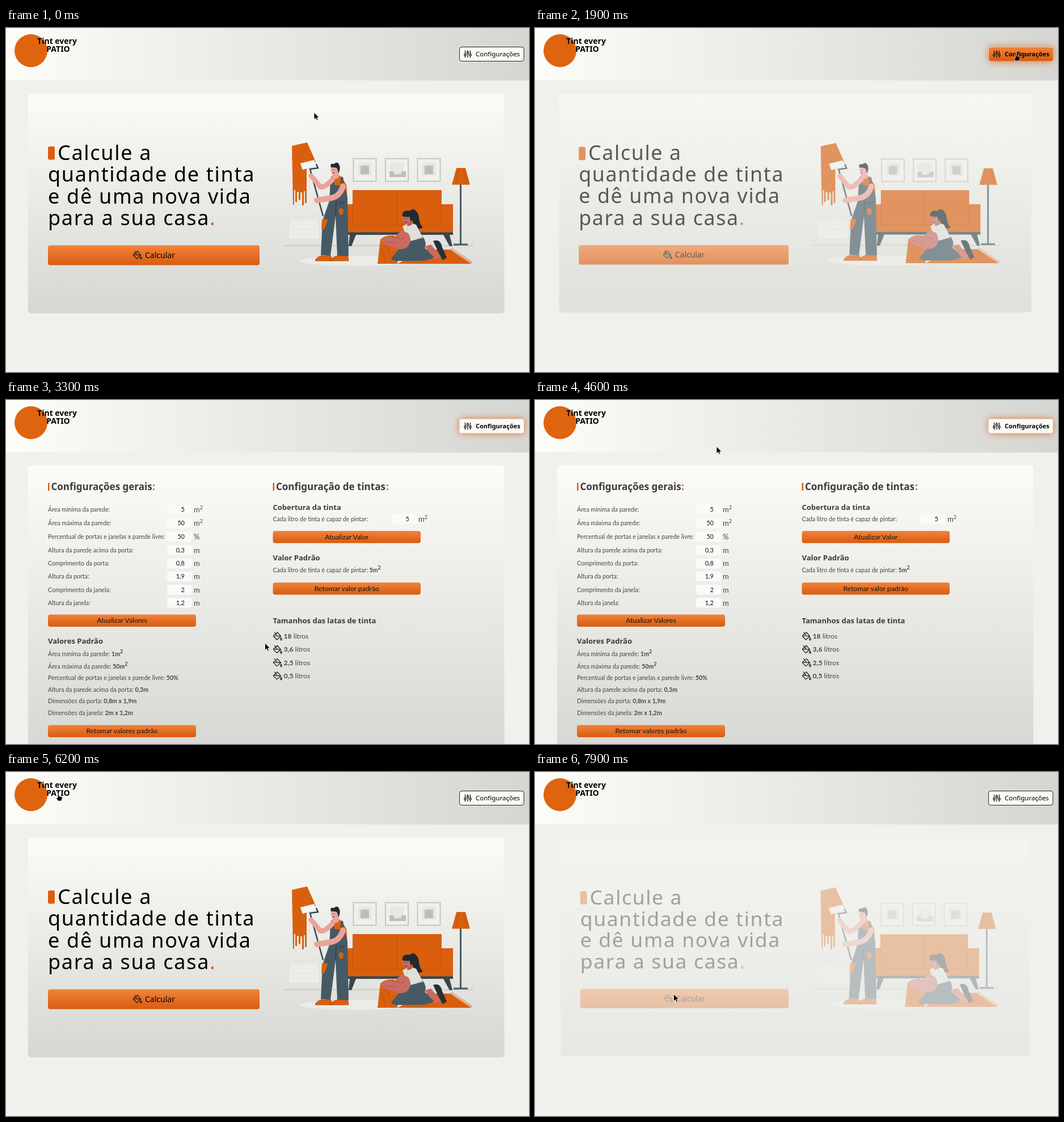
These frames come from a looping animation (922 px wide and 607 px high, 8000 ms). An HTML page:

```html
<!DOCTYPE html>
<html lang="pt">
<head>
<meta charset="utf-8">
<title>Calculadora de tinta</title>
<style>
  html, body { margin: 0; height: 100%; overflow: hidden; background: #f0f1ed; }
  svg { display: block; width: 100%; height: 100%; }
  text { font: 10.6px Lato, sans-serif; fill: #454545; white-space: pre; }
  .brand { font: 800 14px "Noto Sans", sans-serif; fill: #000; text-anchor: middle; }
  .hero { font: 36px "Noto Sans", sans-serif; letter-spacing: 1.7px; fill: #000; }
  .title { font: 600 17px "Noto Sans", sans-serif; fill: #3b3b3b; }
  .sub { font: 600 13px "Noto Sans", sans-serif; fill: #3b3b3b; }
  .nav { font: 11.5px "Noto Sans", sans-serif; fill: #000; }
  .active .nav { font-weight: 700; font-size: 11px; }
  .active #navBox { stroke: none; filter: drop-shadow(0 0 7px #e0651ddd); }
  .call { font: 14px "Noto Sans", sans-serif; fill: #000; }
  .button { font-size: 12.2px; fill: #111; text-anchor: middle; }
  .number { font-size: 11px; fill: #111; text-anchor: end; }
  .unit { font-size: 13px; }
  .size { font-size: 12.2px; }
  .bold { font-weight: 700; }
  .accent { fill: #d95f0e; }
  .line { fill: none; stroke: #111; stroke-width: 1.2; stroke-linejoin: round; stroke-linecap: round; }
</style>
</head>
<body>
<svg id="stage" viewBox="0 0 922 607" preserveAspectRatio="none">
  <defs>
    <linearGradient id="paper" x2="0" y2="1">
      <stop stop-color="#fbfcf8"/><stop offset=".3" stop-color="#f0f1ed"/><stop offset="1" stop-color="#d6d7d3"/>
    </linearGradient>
    <linearGradient id="header">
      <stop stop-color="#fcfdf9"/><stop offset=".3" stop-color="#f0f1ed"/><stop offset="1" stop-color="#d5d6d2"/>
    </linearGradient>
    <linearGradient id="orange" x2="0" y2="1">
      <stop stop-color="#f1833c"/><stop offset="1" stop-color="#d85c10"/>
    </linearGradient>
    <g id="bucket" class="line">
      <path d="M2 6 L8 1 L14 8 L7 14 L1 8 Z M2 7 L13 8 M3 1 L7 6"/>
      <path d="M14.5 10.5 Q12 14 14.5 15 Q17 14 14.5 10.5 Z"/>
    </g>
    <g id="frame">
      <rect x="1" y="1" width="40" height="40" fill="#f0f1ed" stroke="#c6c7c3" stroke-width="2"/>
      <rect x="9" y="8" width="24" height="23" fill="#e6e7e3"/>
    </g>
  </defs>
  <rect width="922" height="607" fill="#f0f1ed"/>

  <g id="home">
    <rect x="39" y="115.5" width="839.5" height="388" rx="5" fill="url(#paper)"/>
    <rect class="accent" x="74" y="209" width="12" height="23.5" rx="3"/>
    <g id="scene">
      <path d="M490 384 H824" stroke="#a9aaa7" stroke-width=".8"/>
      <ellipse cx="619" cy="411" rx="101" ry="9" fill="#ebece8"/>
      <path d="M499 339 h53 v34 h-53 z M499 356 h53 M504 373 v11 M547 373 v11 M518 347 h14 M518 364 h14" fill="#ecede9" stroke="#dedfdb" stroke-width=".8"/>
      <use href="#frame" x="611.5" y="229.5"/><rect x="625" y="243" width="15" height="15" fill="#bdbeba"/>
      <use href="#frame" x="668" y="229.5"/><path d="M676 253 h8 v5 h13 v-5 h8 v10 h-29 z" fill="#bdbeba"/>
      <use href="#frame" x="724.5" y="229.5"/><rect x="738" y="243" width="15" height="15" fill="#bdbeba"/>
      <g fill="#d95f0e">
        <path d="M504 208 L531 202 L546 236 L521 243 L530 247 V308 q-1.5 3 -3 0 V288 h-2 V312 q-1.5 3 -3 0 V290 h-3 V303 q-1.5 2 -3 0 V289 h-3 V306 q-1.5 3 -3 0 V286 h-2 V311 q-1 4 -2 0 Z"/>
        <rect x="600" y="311" width="20" height="50"/>
        <rect x="760" y="311" width="28" height="50"/>
        <rect x="611" y="286" width="157" height="75"/>
        <path d="M794 247 H810 L818 276.5 H786 Z"/>
        <path d="M738 391 H783 L820 416 H690 Z"/>
      </g>
      <path d="M688.5 286 V348 M611 311 V348 H767 V311 M620 350 L626 355 M762 350 L756 355 M797 248 L793 276 M807 248 L812 276" fill="none" stroke="#b54b08" stroke-width=".8"/>
      <path d="M762 392 L788 415 M771 392 L799 415 M779 392 L809 415" stroke="#c2530b" stroke-width=".7"/>
      <path d="M785 390 L822 415" stroke="#d95f0e" stroke-width="5" stroke-dasharray="1 2"/>
      <path d="M602 360.5 H788 V365 H602 Z M606 365 H617 L609 385 H604 Z M771 365 H782 L787 385 H782 Z" fill="#37474f"/>
      <path d="M801.5 276 V382" stroke="#455a64" stroke-width="3"/>
      <rect x="789" y="380.5" width="25" height="3" fill="#455a64"/>

      <path d="M573 262 L588 260 L600 276 L602 303 L574 306 Z" fill="#d95f0e"/>
      <path d="M572 268 L577 266 L580 278 L590 277 L590 262 L594 263 L602 301 L604 402 L584 402 L581 332 L572 402 L555 401 L558 340 L570 305 Z" fill="#455a64"/>
      <path d="M581 332 L582 305 M586 310 L598 307" stroke="#263238"/>
      <path d="M557 338 Q562 335 567 339 L563 351 Q559 358 556 356 Z M586 320 L590 318 L595 320 L594 329 L588 330 Z" class="accent"/>
      <path d="M545 411 Q546 405 555 402 H573 L575 411 Z M571 411 Q573 405 583 402 H603 L604 411 Z" class="accent" stroke="#a5430a" stroke-width=".6"/>
      <path d="M519 239 L543 233 L548 243 L523 250 Z" fill="#f5f5f2" stroke="#d0d1cd" stroke-width=".7"/>
      <path d="M547 240 L550 247 L536 249 L559 332" fill="none" stroke="#344750" stroke-width="2.5"/>
      <path d="M575 268 Q558 286 552 278 L538 261" fill="none" stroke="#eda299" stroke-width="9" stroke-linecap="round"/>
      <path d="M594 279 Q589 297 573 300 L548 304" fill="none" stroke="#eda299" stroke-width="10" stroke-linecap="round"/>
      <path d="M576 255 H587 V264 L580 267 L575 263 Z" fill="#eda299"/>
      <ellipse cx="580" cy="250" rx="7" ry="9" fill="#eda299"/>
      <path d="M573 246 Q570 238 578 240 Q585 234 588 243 Q590 250 586 256 L584 248 Q580 245 573 246 Z" fill="#202a2f"/>
      <path d="M575 250 v1 M578 250 v1 M575 256 q2 1 4 -1" stroke="#202a2f" fill="none"/>

      <path d="M714 326 Q709 320 719 320 Q727 324 728 335 Q729 347 735 352 Q724 358 720 349 Q714 338 714 326 Z" fill="#202a2f"/>
      <path d="M738 386 L749 382 L767 404 L757 408 Z" fill="#c96a62"/>
      <path d="M753 376 Q766 371 769 387 L777 405 L770 410 L763 397 Z" fill="#263238"/>
      <path d="M660 373 Q668 365 684 366 L698 386 Q692 400 690 416 H655 Z" fill="#d95f0e"/>
      <path d="M663 378 Q676 384 680 415 M661 388 Q668 396 667 415" fill="none" stroke="#b54b08" stroke-width=".8"/>
      <path d="M704 378 L733 366 Q743 378 738 388 L754 404 Q748 411 730 411 H688 Q674 410 684 401 Q694 388 704 378 Z" fill="#455a64"/>
      <path d="M699 350 Q710 342 723 347 L735 370 L709 377 Z" fill="#dfdfda"/>
      <path d="M698 357 L709 362 Q717 374 709 385 Q702 393 688 389 L665 381 L661 374 Q668 367 684 369 Z" fill="#c96a62"/>
      <path d="M684 369 L704 372 M668 377 L690 381" stroke="#a94f49" stroke-width=".7"/>
      <path d="M705 340 L714 336 L716 347 L708 350 Z" fill="#b95953"/>
      <ellipse cx="707" cy="336" rx="8" ry="10" fill="#c96a62"/>
      <path d="M699 332 Q697 323 708 322 Q718 323 718 333 L714 342 L711 333 Q704 334 699 332 Z" fill="#202a2f"/>
      <path d="M701 336 h2 M706 336 h2 M702 342 q3 2 5 0" stroke="#202a2f" fill="none" stroke-width=".8"/>
    </g>
  </g>

  <g id="settings">
    <rect x="39" y="115.5" width="839.5" height="509" rx="5" fill="url(#paper)"/>
  </g>

  <rect width="922" height="92.5" fill="url(#header)"/>
  <circle cx="44" cy="40" r="29" fill="#df640f"/>
  <text class="brand" x="90" y="28">Tint every</text>
  <text class="brand" x="92" y="42">PATIO</text>
  <g id="nav">
    <rect id="navBox" x="799.5" y="33.5" width="113.5" height="25" rx="4" fill="#fafbf7" stroke="#222"/>
    <rect id="navHover" x="800" y="34" width="113" height="24.5" rx="4" fill="url(#orange)"/>
    <path class="line" d="M809.5 40 V46 M809.5 49 V52 M814 40 V42 M814 45 V52 M818.5 40 V46 M818.5 49 V52"/>
    <path class="line" d="M808 46 h3 v3 h-3 z M812.5 42 h3 v3 h-3 z M817 46 h3 v3 h-3 z"/>
    <text class="nav" x="828" y="50">Configurações</text>
  </g>
  <g id="pointer">
    <path id="arrow" d="M0 0 V12.5 L3 9.8 L5 14 L7 13 L5.2 9 H9 Z" fill="#000" stroke="#fff" stroke-width=".8"/>
    <path id="hand" d="M-1 .8 Q0 -.5 1.2 .8 V4.5 L6 5.5 Q7.5 6 7 8.5 L5.5 13 H-.5 L-3.5 8 Q-3 6.5 -1 8 Z" fill="#000" stroke="#fff" stroke-width=".7"/>
  </g>
</svg>
<script>
const $ = id => document.getElementById(id);
const buttons = [];
const add = (page, markup) => $(page).insertAdjacentHTML('beforeend', markup);
const text = (page, cls, x, y, content) => add(page, `<text class="${cls}" x="${x}" y="${y}">${content}</text>`);
const sup = '<tspan dy="-5" font-size="9">2</tspan>';
const fact = (x, y, label, value) => text('settings', '', x, y + 4, `${label}: <tspan class="bold">${value}</tspan>`);

function button(page, x, y, w, h, label) {
  const box = `<rect x="${x}" y="${y}" width="${w}" height="${h}" rx="4"`;
  add(page, `${box} fill="url(#orange)"/>${box} fill="#d85c10"/>`);
  buttons.push({ page, x, y, w, h, hover: $(page).lastElementChild });
  if (label) text(page, 'button', x + w / 2, y + h / 2 + 4, label);
}

function field(x, y, label, value, unit, boxX) {
  text('settings', '', x, y + 4, label + ':');
  add('settings', `<rect x="${boxX}" y="${y - 8.5}" width="44" height="17.5" rx="4" fill="#fafbf8"/>`);
  text('settings', 'number', boxX + 31, y + 4, value);
  text('settings', 'unit', boxX + 47, y + 5, unit);
}

function title(x, label, colonX) {
  add('settings', `<rect class="accent" x="${x}" y="146" width="2.5" height="14"/>`);
  text('settings', 'title', x + 5.5, 159, label);
  text('settings', 'title', colonX, 159, '<tspan class="accent">:</tspan>');
}

// Home
text('home', 'hero', 91, 232.5, 'Calcule a');
text('home', 'hero', 74, 271, 'quantidade de tinta');
text('home', 'hero', 74, 309.5, 'e dê uma nova vida');
text('home', 'hero', 74, 348, 'para a sua casa<tspan class="accent">.</tspan>');
button('home', 74, 383.5, 373, 35);
add('home', '<use href="#bucket" x="223.5" y="393"/>');
text('home', 'call', 245, 406, 'Calcular');

// Settings, left column
title(74, 'Configurações gerais', 258);
[
  ['Área mínima da parede', '5', 'm' + sup, 193],
  ['Área máxima da parede', '50', 'm' + sup, 217],
  ['Percentual de portas e janelas x parede livre', '50', '%', 241],
  ['Altura da parede acima da porta', '0,3', 'm', 264.5],
  ['Comprimento da porta', '0,8', 'm', 288],
  ['Altura da porta', '1,9', 'm', 311],
  ['Comprimento da janela', '2', 'm', 334.5],
  ['Altura da janela', '1,2', 'm', 357.5]
].forEach(([label, value, unit, y]) => field(74, y, label, value, unit, 284));
button('settings', 74, 378.5, 261, 21.5, 'Atualizar Valores');
text('settings', 'sub', 74, 430, 'Valores Padrão');
[
  ['Área mínima da parede', '1m' + sup, 448],
  ['Área máxima da parede', '50m' + sup, 470],
  ['Percentual de portas e janelas x parede livre', '50%', 490],
  ['Altura da parede acima da porta', '0,3m', 510.5],
  ['Dimensões da porta', '0,8m x 1,9m', 531],
  ['Dimensões da janela', '2m x 1,2m', 551.5]
].forEach(([label, value, y]) => fact(74, y, label, value));
button('settings', 74, 573.5, 261, 21.5, 'Retomar valores padrão');

// Settings, right column
title(470.5, 'Configuração de tintas', 670);
text('settings', 'sub', 470.5, 193.5, 'Cobertura da tinta');
field(470.5, 210, 'Cada litro de tinta é capaz de pintar', '5', 'm' + sup, 680);
button('settings', 470.5, 231, 260.5, 21.5, 'Atualizar Valor');
text('settings', 'sub', 470.5, 282.5, 'Valor Padrão');
fact(470.5, 300, 'Cada litro de tinta é capaz de pintar', '5m' + sup);
button('settings', 470.5, 322, 260.5, 21.5, 'Retomar valor padrão');
text('settings', 'sub', 470.5, 394, 'Tamanhos das latas de tinta');
['18', '3,6', '2,5', '0,5'].forEach((liters, i) => {
  const y = 417 + i * 23.3;
  add('settings', `<use href="#bucket" x="470.5" y="${y - 8}"/>`);
  text('settings', 'size', 489.5, y + 4, `<tspan class="bold">${liters}</tspan> litros`);
});

// Keyframes: time, then values
const homeFade = [[0, 1], [1700, 1], [1800, .85], [1900, .63], [2000, .25], [2100, 0],
  [5900, 0], [6000, .15], [6100, .6], [6200, 1], [7700, 1], [7800, .68], [7900, .33]];
const settingsFade = [[0, 0], [2000, 0], [2100, .2], [2200, .5], [2300, .5], [2400, .8], [2500, 1],
  [5800, 1], [5900, .5], [6000, 0]];
const path = [[0, 543, 149], [300, 543, 149], [400, 389, 139], [500, 389, 139], [700, 86, 325],
  [900, 200, 342], [1200, 600, 200], [1400, 848, 45], [2300, 848, 45], [2400, 815, 80],
  [2800, 620, 300], [3200, 513, 426], [3300, 456.5, 429], [3400, 300, 388], [3500, 340, 420],
  [3700, 340, 420], [3900, 450, 446], [4200, 827, 330], [4400, 640, 240], [4600, 320, 82],
  [4900, 129, 52], [5000, 129, 52], [5100, 92, 38], [5500, 92, 38], [5600, 141, 65],
  [5700, 141, 65], [5800, 92, 38], [6200, 92, 38], [6600, 255, 320], [6700, 255, 320],
  [7000, 244.5, 392]];

function valueAt(keys, t) {
  const i = keys.findIndex(key => key[0] > t);
  if (i < 0) return keys[keys.length - 1].slice(1);
  const a = keys[i - 1], b = keys[i], k = (t - a[0]) / (b[0] - a[0]);
  return a.slice(1).map((v, n) => v + (b[n + 1] - v) * k);
}

function showPage(id, fade, centerY) {
  const scale = 1 - .0224 * (1 - fade);
  $(id).setAttribute('opacity', fade);
  $(id).setAttribute('transform', `translate(459 ${centerY}) scale(${scale}) translate(-459 ${-centerY})`);
}

function draw(now) {
  const t = Math.floor(now % 8000 / 100) * 100; // ten steps a second
  const fades = { home: valueAt(homeFade, t)[0], settings: valueAt(settingsFade, t)[0] };
  showPage('home', fades.home, 309.5);
  showPage('settings', fades.settings, 370);

  const [x, y] = valueAt(path, t);
  const inside = b => x >= b.x && x <= b.x + b.w && y >= b.y && y <= b.y + b.h;
  const navHover = inside({ x: 800, y: 33, w: 113, h: 25 });
  let hand = navHover || inside({ x: 15, y: 10, w: 132, h: 60 });
  for (const b of buttons) {
    const hover = fades[b.page] === 1 && inside(b);
    b.hover.setAttribute('opacity', hover ? 1 : 0);
    hand = hand || hover;
  }
  $('navHover').setAttribute('opacity', navHover ? 1 : 0);
  $('nav').setAttribute('class', t >= 1700 && t < 5900 ? 'active' : '');
  $('pointer').setAttribute('transform', `translate(${x} ${y})`);
  $('arrow').setAttribute('opacity', hand ? 0 : 1);
  $('hand').setAttribute('opacity', hand ? 1 : 0);
}

const start = performance.now();
function loop() {
  draw(performance.now() - start);
  requestAnimationFrame(loop);
}
loop();
</script>
</body>
</html>
```
